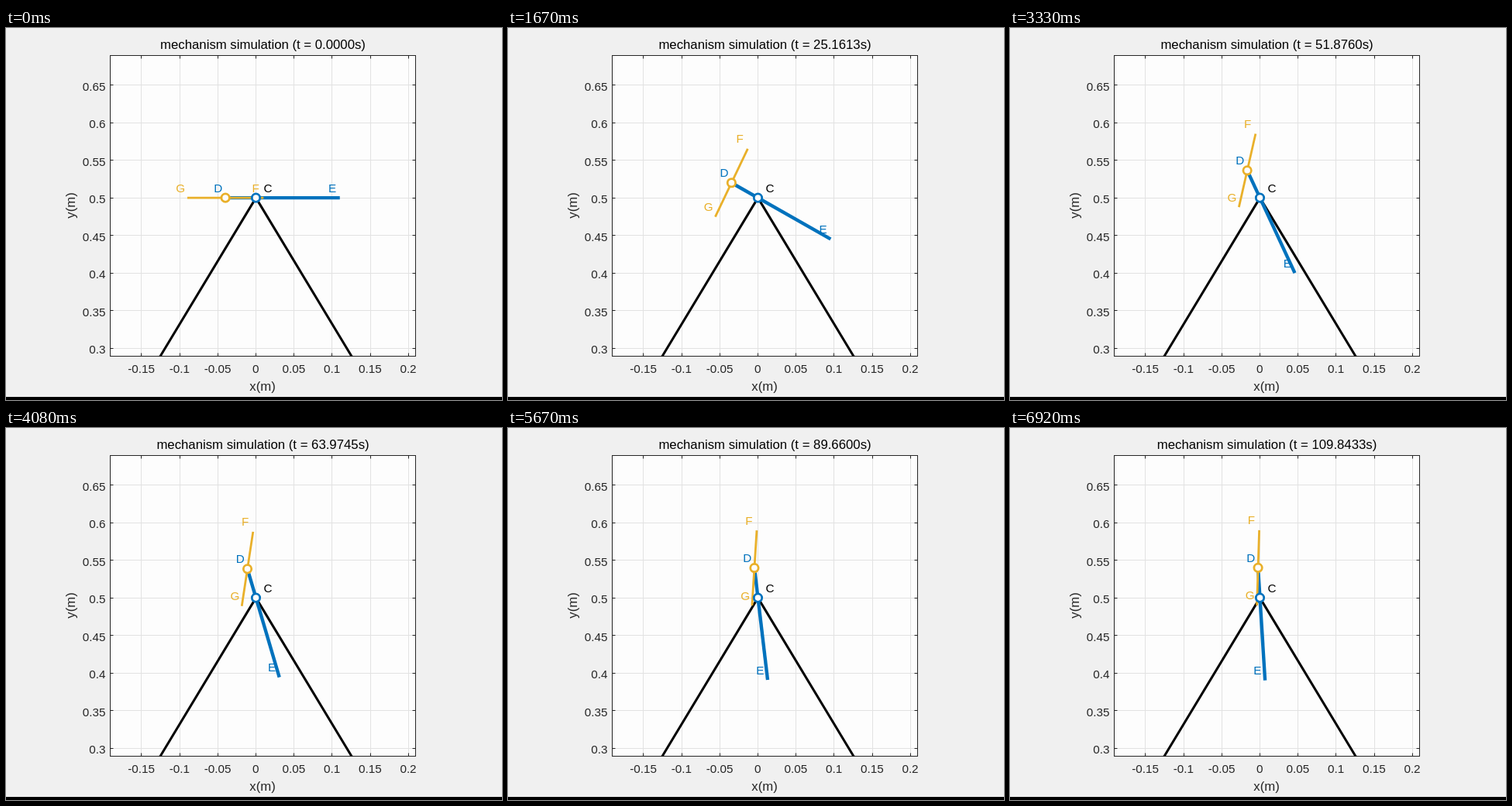
An HTML page with a canvas that plays this animation: 640x480 px, repeating every 7010 ms.

```html
<!DOCTYPE html>
<html lang="en">
<head>
<meta charset="utf-8">
<title>Mechanism simulation</title>
<style>
  html, body { margin: 0; width: 100%; height: 100%; overflow: hidden; background: #f0f0f0; }
  canvas { display: block; }
</style>
</head>
<body>
<canvas id="stage" width="640" height="480"></canvas>
<script>
const ctx = document.getElementById('stage').getContext('2d');
const LOOP = 7010, LAST = 83, RAD = Math.PI / 180;
const BLUE = '#0072bd', GOLD = '#e9b02a', INK = '#262626';
const PAGE = '#f0f0f0', PAPER = '#fdfdfd', GRID = '#e2e2e2';
const BOX = { l: 134.5, t: 35.5, r: 528.5, b: 423.5 };
const FONT = '"Liberation Sans", Arial, sans-serif';
const SMALL = 15.24, LARGE = 16.76;

// Simulated seconds reached at some steps
const CLOCK = [[0, 0], [1, 0.12], [11, 13.1975], [20, 25.1613], [31, 39.7774],
  [49, 63.9745], [68, 89.66], [83, 109.8433]];

// Simulated seconds, then degrees each bar is away from upright
const SWING = [
  [0, 90, 90], [3.3, 89.95, 71], [6.6, 89.1, 55], [9.9, 86.8, 43.7],
  [13.2, 83.3, 36.1], [19.2, 72.3, 29], [25.16, 60.1, 25.2], [39.78, 37.1, 18.2],
  [63.97, 16.2, 8.5], [89.66, 6.65, 3.5], [109.84, 3.5, 1.75]
];

// Overdamped swings are almost straight lines in this space
const toLog = deg => Math.log(Math.tan(deg * RAD / 2));
const fromLog = u => 2 * Math.atan(Math.exp(u));
const curve = col => SWING.map(row => [row[0], toLog(row[col])]);
const LEVER = curve(1), ROCKER = curve(2);

const X = x => 322.5 + 984 * x;
const Y = y => 219.1 - 970 * (y - 0.5);

function segment(pts, x) {
  let i = 0;
  while (i < pts.length - 2 && x > pts[i + 1][0]) i++;
  return i;
}

function linear(pts, x) {
  const i = segment(pts, x), [a, p] = pts[i], [b, q] = pts[i + 1];
  return p + (q - p) * (x - a) / (b - a);
}

function smooth(pts, x) {
  const i = segment(pts, x), [a, p] = pts[i], [b, q] = pts[i + 1];
  const slope = j => {
    const lo = pts[Math.max(0, j - 1)], hi = pts[Math.min(pts.length - 1, j + 1)];
    return (hi[1] - lo[1]) / (hi[0] - lo[0]);
  };
  const h = b - a, s = Math.min(1, (x - a) / h), r = 1 - s;
  return p * (1 + 2 * s) * r * r + q * s * s * (3 - 2 * s)
    + h * s * r * (slope(i) * r - slope(i + 1) * s);
}

function line(x1, y1, x2, y2, color, width) {
  ctx.strokeStyle = color;
  ctx.lineWidth = width;
  ctx.beginPath();
  ctx.moveTo(x1, y1);
  ctx.lineTo(x2, y2);
  ctx.stroke();
}

const bar = (p, q, color, width) => line(X(p[0]), Y(p[1]), X(q[0]), Y(q[1]), color, width);

function ring(p, color) {
  ctx.beginPath();
  ctx.arc(X(p[0]), Y(p[1]), 5.2, 0, 2 * Math.PI);
  ctx.fillStyle = PAPER;
  ctx.fill();
  ctx.strokeStyle = color;
  ctx.lineWidth = 2.8;
  ctx.stroke();
}

function text(str, x, y, size, color, align) {
  ctx.font = size + 'px ' + FONT;
  ctx.fillStyle = color;
  ctx.textAlign = align;
  ctx.fillText(str, x, y);
}

const tag = (str, p, color, dx = -14.8) =>
  text(str, X(p[0]) + dx, Y(p[1]) - 7.4, SMALL, color, 'left');

function axes() {
  const { l, t, r, b } = BOX;
  const xs = [-0.15, -0.1, -0.05, 0, 0.05, 0.1, 0.15, 0.2];
  const ys = [0.3, 0.35, 0.4, 0.45, 0.5, 0.55, 0.6, 0.65];
  const snap = v => Math.floor(v) + 0.5;
  ctx.fillStyle = PAPER;
  ctx.fillRect(l, t, r - l, b - t);
  for (const v of xs) line(snap(X(v)), t, snap(X(v)), b, GRID, 1);
  for (const v of ys) line(l, snap(Y(v)), r, snap(Y(v)), GRID, 1);
  for (const v of xs) {
    const x = snap(X(v));
    line(x, b, x, b - 4, INK, 1);
    line(x, t, x, t + 4, INK, 1);
    text(String(v), X(v) - 0.3, 445, SMALL, INK, 'center');
  }
  for (const v of ys) {
    const y = snap(Y(v));
    line(l, y, l + 4, y, INK, 1);
    line(r, y, r - 4, y, INK, 1);
    text(String(v), 128.5, Y(v) + 7, SMALL, INK, 'right');
  }
  ctx.strokeStyle = INK;
  ctx.lineWidth = 1;
  ctx.strokeRect(l, t, r - l, b - t);
  text('x(m)', 331, 467.5, LARGE, INK, 'center');
  ctx.save();
  ctx.translate(89, 229);
  ctx.rotate(-Math.PI / 2);
  text('y(m)', 0, 0, LARGE, INK, 'center');
  ctx.restore();
}

function mechanism(time) {
  const lever = Math.PI / 2 - fromLog(smooth(LEVER, time));
  const rocker = Math.PI / 2 - fromLog(smooth(ROCKER, time));
  const from = (p, len, angle) => [p[0] + len * Math.cos(angle), p[1] + len * Math.sin(angle)];
  const C = [0, 0.5];
  const D = from(C, -0.04, -lever), E = from(C, 0.11, -lever);
  const F = from(D, 0.05, rocker), G = from(D, -0.05, rocker);

  ctx.save();
  ctx.beginPath();
  ctx.rect(BOX.l, BOX.t, BOX.r - BOX.l, BOX.b - BOX.t);
  ctx.clip();
  for (const side of [-1, 1]) bar(C, [side * 0.15, 0.248], '#000', 3);
  bar(D, E, BLUE, 4.4);
  bar(G, F, GOLD, 2.8);
  ring(D, GOLD);
  ring(C, BLUE);
  ctx.restore();

  tag('F', F, GOLD);
  tag('G', G, GOLD);
  tag('D', D, BLUE);
  tag('E', E, BLUE);
  tag('C', C, '#000', 10);
}

// Steps run at 12 per second, rounded to hundredths
const start = k => Math.round(k * 25 / 3) * 10;

function stepAt(ms) {
  let k = Math.min(LAST, Math.floor(ms * 0.012) + 1);
  while (k > 0 && start(k) > ms) k--;
  return k;
}

function draw(ms) {
  const time = linear(CLOCK, stepAt(ms));
  ctx.fillStyle = PAGE;
  ctx.fillRect(0, 0, 640, 480);
  ctx.fillStyle = '#000';
  ctx.fillRect(0, 476, 640, 4);
  axes();
  text('mechanism simulation (t = ' + time.toFixed(4) + 's)', 331.5, 27, LARGE, '#000', 'center');
  mechanism(time);
}

const origin = performance.now();
function tick() {
  draw((performance.now() - origin) % LOOP);
  requestAnimationFrame(tick);
}
tick();
</script>
</body>
</html>
```
